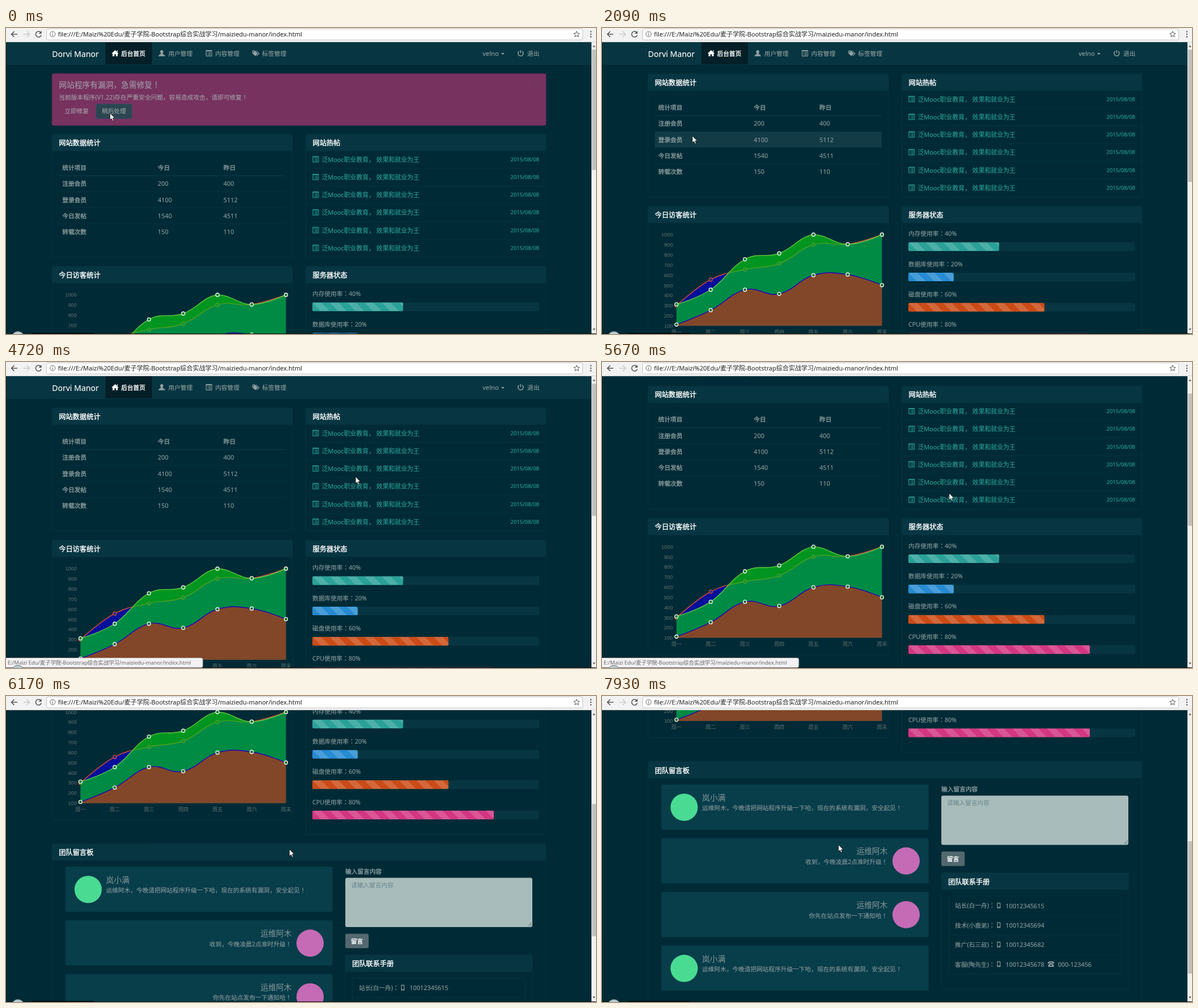
An HTML page for the animation above (8000 ms loop, 1038x539 px).

```html
<!DOCTYPE html>
<html lang="zh-CN">
<head>
<meta charset="utf-8">
<title>后台首页</title>
<style>
html, body { margin: 0; width: 100%; height: 100%; overflow: hidden; background: #002b36; }
svg { display: block; width: 1038px; height: 539px; }
text { font-family: "Noto Sans", "Noto Sans CJK SC", "Noto Sans CJK", sans-serif; white-space: pre; stroke-width: .1px; }
.axis { font-family: "Liberation Sans", "Noto Sans CJK SC", "Noto Sans CJK", sans-serif; }
.mark { font-family: "Noto Sans CJK JP", "Noto Sans CJK", sans-serif; }
.head { stroke-width: .4px; }
</style>
</head>
<body>
<svg id="stage" viewBox="0 0 1038 539" xmlns="http://www.w3.org/2000/svg"></svg>
<script>
const LOOP = 8000, ALERT_END = 60, ALERT_SHIFT = 106;
const BG = '#002b36', PANEL = '#073642', TEXT = '#8b9b9e', LINK = '#2aa198', FAINT = '#06333f';
const SIZE = 10.67;
const times = (n, f) => Array.from({ length: n }, (_, i) => f(i)).join('');

// Text is placed by its vertical centre; full-width marks sit in the middle of their cell.
const text = (x, cy, str, fill = TEXT, size = SIZE, attrs = '') =>
  `<text x="${x}" y="${(cy + size * .37).toFixed(2)}" font-size="${size}" fill="${fill}" stroke="${fill}" ${attrs}>${
    String(str).replace(/[！：]/g, '<tspan class="mark" lang="ja">$&</tspan>')}</text>`;
const rect = (x, y, x2, y2, fill, attrs = '') =>
  `<rect x="${x}" y="${y}" width="${x2 - x}" height="${y2 - y}" fill="${fill}" ${attrs}/>`;
const path = (d, fill = 'none', attrs = '') => `<path d="${d}" fill="${fill}" ${attrs}/>`;
const at = (x, y, body, attrs = '') => `<g transform="translate(${x} ${y})" ${attrs}>${body}</g>`;
const END = 'text-anchor="end"', MID = 'text-anchor="middle"', HEAD = 'class="head"';

const panel = (x, y, x2, y2, title) =>
  rect(x, y, x2, y2, 'none', `rx="3" stroke="${PANEL}" stroke-width=".8"`) +
  rect(x, y, x2, y + 29.5, PANEL, 'rx="2.5"') +
  text(x + 12, y + 15.5, title, '#fff', 12.2, HEAD);

// Icons are centred on their own origin.
const icon = {
  list: c => path('M-5-5H5V5H-5ZM-5-4H5M-3.2-1.5h1M-3.2 .8h1M-3.2 3h1M-1-1.5h4.4M-1 .8h4.4M-1 3h4.4', 'none', `stroke="${c}"`),
  home: c => path('M0-5.5 6.3 .6H4.5V5.2H1.3V1.8H-1.3V5.2H-4.5V.6H-6.3ZM3-5h1.6v3L3-3.5Z', c),
  user: c => path('M0-5.6C2-5.6 2.9-4.3 2.7-2.4 2.5-.8 1.8 .2 1.5 .7 1.5 2 5.7 2 5.7 5.2H-5.7C-5.7 2-1.5 2-1.5 .7-1.8 .2-2.5-.8-2.7-2.4-2.9-4.3-2-5.6 0-5.6Z', c),
  tags: c => path('M-6.5-4.7H-2L3 .4-1.5 5-6.5 0ZM-.7-4.7H.5L6 .4 1.5 5 .7 4.2 4.4 .4Z', c) + `<circle cx="-4.3" cy="-2.6" r="1" fill="${PANEL}"/>`,
  power: c => path('M-2.8-3.6A4.6 4.6 0 1 0 2.8-3.6M0-5.6V-.2', 'none', `stroke="${c}" stroke-width="1.5"`),
  mobile: c => rect(-3, -5, 3, 5, c, 'rx="1.2"') + rect(-2, -3.6, 2, 2.6, BG) + `<circle cy="3.8" r=".7" fill="${BG}"/>`,
  phone: c => path('M-6-1.5C-6-6 6-6 6-1.5L3.2-.8 2.4-2.6H-2.4L-3.2-.8ZM-2-1.6H2L5 2.4V4.8H-5V2.4Z', c) + `<circle cy="1.7" r="1.5" fill="${BG}"/>`
};

function navbar() {
  const c = '#93a1a1';
  return rect(0, 25, 1030, 65, PANEL) + rect(175, 25, 257, 64, '#041f27') +
    text(81, 45.5, 'Dorvi Manor', '#fff', 14) +
    at(192, 44.5, icon.home('#fff')) + text(202.5, 45, '后台首页', '#fff', SIZE, HEAD) +
    at(274, 44.5, icon.user(c)) + text(285.5, 45, '用户管理', c) +
    at(357, 44.5, icon.list(c)) + text(368, 45, '内容管理', c) +
    at(440, 44.5, icon.tags(c)) + text(450.5, 45, '标签管理', c) +
    text(867, 45, 'velno', c, 11.2, END) + path('M871 44h6l-3 3.2Z', c) +
    at(905.5, 44.5, icon.power(c)) + text(917, 45, '退出', c);
}

function alertBox() {
  const c = '#a39fac';
  return rect(81, 80.5, 950, 171.5, '#77325f', 'rx="3" stroke="#6e2a66" stroke-width=".8"') +
    text(93, 99.5, '网站程序有漏洞，急需修复！', c, 13.7) +
    text(93, 122, '当前版本程序(V1.22)存在严重安全问题，容易造成攻击，请即可修复！', c) +
    text(103, 146.5, '立即修复', c) +
    rect(158.5, 134, 221.5, 159.5, '#2c4550', 'rx="3" stroke="#2a4f6c"') + text(168.5, 146.5, '稍后处理', '#9aa9ad') +
    path('M928.8 96.7l6.4 6.6m0-6.6l-6.4 6.6', 'none', 'stroke="#63395f" stroke-width="1.3"');
}

const rowTop = i => 154.2 + 28.2 * i;
function statsTable() {
  const rows = [['统计项目', '今日', '昨日'], ['注册会员', 200, 400], ['登录会员', 4100, 5112], ['今日发帖', 1540, 4511], ['转载次数', 150, 110]];
  return panel(81, 81, 504, 298, '网站数据统计') +
    rect(93, 0, 492, 28.2, '#123b46', 'id="rowHover"') +
    times(4, i => rect(93, rowTop(i) - .5, 492, rowTop(i) + .5, i ? FAINT : '#0a3d4a')) +
    rows.map((cells, i) => cells.map((cell, k) =>
      text([99, 267, 382.5][k], i ? rowTop(i) - 14 : 139.7, cell, TEXT, isNaN(cell) ? SIZE : 10.9, k && i ? '' : HEAD)).join('')).join('');
}

const linkY = i => 125.7 + 31.2 * i;
function hotPosts() {
  return panel(527.5, 81, 950, 298, '网站热帖') + times(6, i =>
    (i ? rect(528, linkY(i) - 15.9, 950, linkY(i) - 15.1, FAINT) : '') +
    at(544.8, linkY(i) - .5, icon.list(LINK)) +
    text(555.5, linkY(i), '泛Mooc职业教育， 效果和就业为王', LINK, 10.85) +
    text(938, linkY(i) - .5, '2015/08/08', LINK, 9.5, END)) +
    rect(550, 0, 728, .9, LINK, 'id="underline"');
}

const chartX = i => 131 + 60.25 * i;
const chartY = v => 542.3 - .1783 * v;
function curve(values) {
  const p = values.map((v, i) => [chartX(i), chartY(v)]);
  const slope = i => i && i < p.length - 1 ? (p[i + 1][1] - p[i - 1][1]) * .2 : 0;
  const reach = i => i && i < p.length - 1 ? 24.1 : 0;
  const clamp = y => Math.max(chartY(1000), Math.min(chartY(100), y));
  return 'M' + p[0] + p.slice(1).map(([x, y], i) =>
    `C${p[i][0] + reach(i)} ${clamp(p[i][1] + slope(i))} ${x - reach(i + 1)} ${clamp(y - slope(i + 1))} ${x} ${y}`).join('');
}
function series(values, area, line, dotFill, dotLine) {
  const d = curve(values), base = chartY(100);
  return path(`${d}V${base}H${chartX(0)}Z`, area, 'fill-opacity=".63"') +
    path(d, 'none', `stroke="${line}" stroke-width="1.4"`) +
    values.map((v, i) => `<circle cx="${chartX(i)}" cy="${chartY(v)}" r="3" fill="${dotFill}" stroke="${dotLine}" stroke-width="1.3"/>`).join('');
}
function visitors() {
  const grey = '#5c696d';
  return panel(81, 314, 504, 554, '今日访客统计') +
    times(10, i => text(124.5, chartY(100 + 100 * i), 100 + 100 * i, grey, 9.14, `class="axis" ${END}`)) +
    [...'一二三四五六末'].map((d, i) => text(chartX(i), 535.2, '周' + d, grey, 9.14, `class="axis" ${MID}`)).join('') +
    series([300, 556, 656, 714, 901, 905, 1000], 'rgb(0,0,214)', '#e04a35', '#1a2a80', '#d8473a') +
    series([312, 456, 757, 815, 1000, 905, 1000], 'rgb(0,211,20)', '#62c93c', '#0b7a2b', '#eef5ee') +
    series([112, 254, 456, 415, 599, 606, 501], 'rgb(206,33,26)', '#2300bb', '#1c6a25', '#eef5ee');
}

function server() {
  const bars = [['内存', 40, '#2aa198'], ['数据库', 20, '#268bd2'], ['磁盘', 60, '#cb4b16'], ['CPU', 80, '#d33682']];
  return panel(527.5, 314, 950, 579.5, '服务器状态') + bars.map(([name, pct, color], i) =>
    at(539, 377.5 + 53.4 * i,
      text(0, -15.2, `${name}使用率：${pct}%`) +
      rect(0, 0, 399, 15.2, PANEL, 'rx="3"') +
      rect(0, 0, 3.99 * pct, 15.2, color, 'rx="2"') + rect(0, 0, 3.99 * pct, 15.2, 'url(#stripes)', 'rx="2"'))).join('');
}

function message(i, mine) {
  const [name, body] = mine
    ? ['岚小满', '运维阿木，今晚请把网站程序升级一下哈，现在的系统有漏洞，安全起见！']
    : ['运维阿木', i === 1 ? '收到，今晚凌晨2点准时升级！' : '你先在站点发布一下通知哈！'];
  const x = mine ? 176 : 502.5, anchor = mine ? '' : END;
  return at(0, 636.5 + 94.6 * i,
    rect(104.5, 0, 574.5, 79.3, '#083d4a', 'rx="3"') +
    `<circle cx="${mine ? 144.5 : 535}" cy="40" r="24" fill="${mine ? '#4adb93' : '#c56bb5'}"/>` +
    text(x, 22.7, name, '#7f9396', 13.7, anchor) + text(x, 41.5, body, TEXT, SIZE, anchor));
}

function board() {
  const staff = [['站长(白一舟)', '10012345615'], ['技术(小鹿弟)', '10012345694'], ['推广(石三叔)', '10012345682'], ['客服(陶先生)', '10012345678']];
  return panel(81, 596, 950, 1060, '团队留言板') + times(4, i => message(i, i % 3 === 0)) +
    text(597, 644.5, '输入留言内容', TEXT, SIZE, HEAD) +
    rect(597, 656, 926, 742.8, '#a9bcbc', 'rx="3"') + text(607, 668.7, '请输入留言内容', '#6d8a90') +
    path('M918.5 741l6-6m-3 6l3-3', 'none', 'stroke="#4f6266" stroke-width=".9"') +
    rect(597, 754.5, 638, 780, '#53686f', 'rx="3"') + text(617.5, 767.3, '留言', '#fff', SIZE, `${HEAD} ${MID}`) +
    panel(597, 792, 926, 997.5, '团队联系手册') +
    rect(609.5, 832.5, 913.5, 970.3, 'none', `rx="3" stroke="${PANEL}" stroke-width=".8"`) +
    staff.map(([who, number], i) => at(0, 850 + 34.4 * i,
      (i ? rect(610, -17.6, 913, -16.8, FAINT) : '') + text(621, 0, who + '：') +
      at(698, -.5, icon.mobile(TEXT)) + text(710, 0, number, TEXT, 10.85))).join('') +
    at(790, 952.7, icon.phone(TEXT)) + text(802, 953.2, '000-123456', TEXT, 10.85);
}

const PATH = '麦子学院-Bootstrap综合实战学习/maiziedu-manor/index.html';
function browserBar() {
  const line = 'stroke-width="1.6" stroke=';
  return rect(0, 0, 1038, 25, '#f2f2f2') + rect(0, 24, 1038, 25, '#d5d5d5') +
    path('M20 11H9.5m5-5l-5 5 5 5', 'none', line + '"#555"') + path('M31 11h10.5m-5-5l5 5-5 5', 'none', line + '"#ccc"') +
    path('M61.2 8A5 5 0 1 0 62 12.5', 'none', line + '"#555"') + path('M62.5 5v5h-5Z', '#555') +
    rect(71.5, 1.5, 1014.5, 21, '#fff', 'rx="2" stroke="#c4c4c4"') +
    '<circle cx="82" cy="10.7" r="4.6" fill="none" stroke="#666"/>' + path('M82 8v1.2m0 1v3.2', 'none', 'stroke="#666" stroke-width="1.1"') +
    text(91.5, 10.7, 'file:///E:/Maizi%20Edu/' + PATH, '#333', 11) +
    path('M1004 5.8l1.5 3.3 3.6.4-2.7 2.4.8 3.6-3.2-1.8-3.2 1.8.8-3.6-2.7-2.4 3.6-.4Z', 'none', 'stroke="#555"') +
    times(3, i => `<circle cx="1029" cy="${6.5 + 4.5 * i}" r="1.2" fill="#555"/>`);
}

const stage = document.getElementById('stage');
stage.innerHTML = `
  <defs>
    <clipPath id="view">${rect(0, 25, 1030, 538, '#000')}</clipPath>
    <pattern id="stripes" width="30.48" height="15.24" patternUnits="userSpaceOnUse">
      ${path('M0 0H15.24L30.48 15.24H15.24Z', '#fff', 'fill-opacity=".16"')}
    </pattern>
  </defs>
  ${rect(0, 0, 1038, 539, BG)}
  <g clip-path="url(#view)"><g id="page">${navbar()}
    <g id="alert">${alertBox()}</g>
    <g id="content">${statsTable()}${hotPosts()}${visitors()}${server()}${board()}</g>
  </g></g>
  ${rect(1030, 25, 1038, 539, '#f1f1f1')}${path('M1032 33.5h5l-2.5-3ZM1032 529.5h5l-2.5 3Z', '#555')}
  ${rect(1031, 0, 1038, 1, '#c1c1c1', 'id="thumb"')}
  ${rect(0, 25, 1, 539, '#0b1a1f')}${rect(0, 538, 1038, 539, '#0a0f11')}${rect(46, 537.4, 155, 539, '#000')}
  <g id="status">${rect(-3, 521.5, 346, 538, '#f3f1f3', 'rx="2.5" stroke="#c9c9c9"')}${text(3, 529.7, 'E:/Maizi Edu/' + PATH, '#777', 9.35)}</g>
  <circle cx="21" cy="546" r="11.5" fill="#b9cdd4" stroke="#5f7076"/>
  ${browserBar()}
  <g id="cursor" stroke="#111" stroke-width=".8" stroke-linejoin="round">
    ${path('M0 0V12L2.7 9.5 4.6 13.8 6.6 12.9 4.8 8.8H8.5Z', '#fff', 'id="arrow"')}
    ${path('M-1.2-1.5C-1.2-3 1-3 1-1.5V3C1 1.8 3 1.9 3 3.3 3.2 2.3 5 2.5 5 3.9 5.3 3.1 7 3.3 7 4.8V9C7 10.5 6 11.3 5.8 14H-.5C-.7 11.5-3 10-4.2 6.5-4.3 5-2.2 5-1.2 6.7Z', '#fff', 'id="hand"')}
  </g>`;

const el = id => document.getElementById(id);
const show = (id, on) => el(id).setAttribute('visibility', on ? 'visible' : 'hidden');
const move = (id, x, y) => el(id).setAttribute('transform', `translate(${x} ${y})`);

// Each key is a time followed by the values reached then.
const cursorKeys = [[0, 183, 150], [880, 183, 150], [960, 181, 157], [1180, 181, 157], [1400, 172, 143], [1790, 160, 187],
  [2030, 160, 187], [2090, 159, 190], [2660, 165, 258], [2900, 165, 258], [3100, 587, 250], [3650, 592, 132], [4070, 592, 132],
  [4180, 598, 166], [4450, 598, 166], [4720, 615, 202], [4960, 615, 202], [5100, 613, 216], [5520, 613, 216],
  [5670, 611, 231], [6170, 499, 270], [6370, 430, 266], [7520, 430, 266], [7930, 416, 262]];
const scrollKeys = [[0, 0], [5490, 0], [5670, 38], [6170, 335.5], [6370, 381], [7500, 381], [7930, 480.5]];

function sample(keys, t) {
  const next = keys.findIndex(k => k[0] > t);
  if (next < 0) return keys[keys.length - 1].slice(1);
  const a = keys[next - 1], b = keys[next], u = (t - a[0]) / (b[0] - a[0]);
  return a.slice(1).map((v, i) => v + (b[i + 1] - v) * u);
}

function draw(t) {
  const [x, y] = sample(cursorKeys, t), [scroll] = sample(scrollKeys, t);
  const alertOpen = t < ALERT_END, live = !alertOpen && scroll === 0;
  move('page', 0, -scroll);
  move('content', 0, alertOpen ? ALERT_SHIFT : 0);
  show('alert', alertOpen);

  const row = Math.floor((y - rowTop(0)) / 28.2);
  const onRow = live && x > 93 && x < 492 && row >= 0 && row < 4;
  show('rowHover', onRow);
  if (onRow) el('rowHover').setAttribute('y', rowTop(row));

  const link = Math.round((y - linkY(0)) / 31.2);
  const onLink = live && x > 550 && x < 728 && link >= 0 && link < 6 && Math.abs(y - linkY(link)) < 7.6;
  show('underline', onLink);
  if (onLink) el('underline').setAttribute('y', linkY(link) + 5.3);

  const viewport = 514, track = 487, height = 1074 + (alertOpen ? ALERT_SHIFT : 0);
  el('thumb').setAttribute('y', 38 + scroll * track / height);
  el('thumb').setAttribute('height', viewport * track / height);

  el('status').setAttribute('opacity', t < 3780 || t >= 5950 ? 0 : t < 3860 ? .5 : 1);
  move('cursor', x, y);
  show('arrow', !onLink);
  show('hand', onLink);
}

function tick() {
  draw(performance.now() % LOOP);
  requestAnimationFrame(tick);
}
tick();
</script>
</body>
</html>
```
